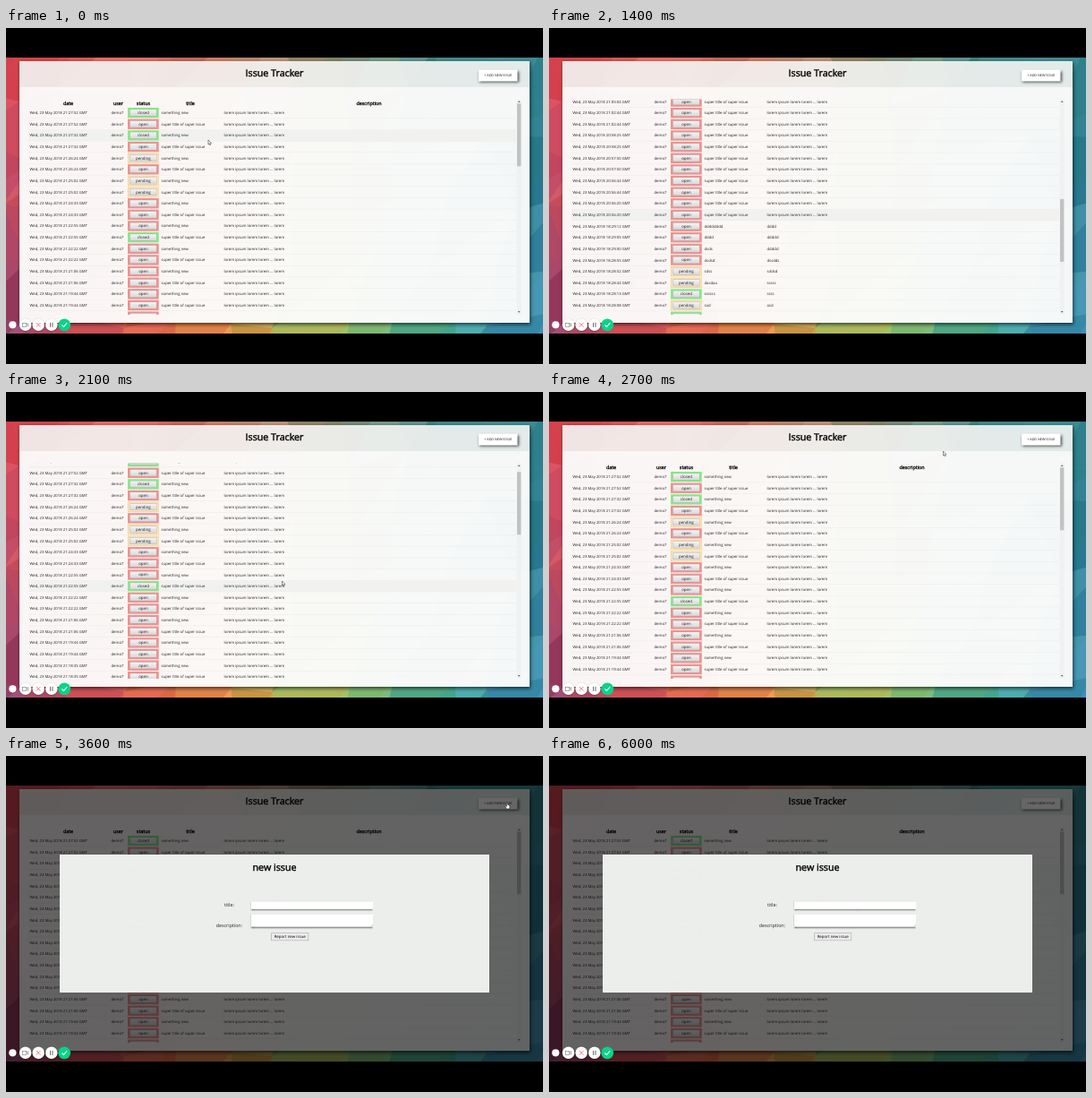
Recreate the animation shown at these times as an HTML page with a canvas. Size 600 by 375 pixels, loop 6.1 s.

```html
<!DOCTYPE html>
<html lang="en">
<head>
<meta charset="utf-8">
<title>Issue Tracker</title>
<style>
  html, body { margin: 0; width: 100%; height: 100%; overflow: hidden; background: #000; }
  canvas { display: block; width: 600px; height: 375px; }
</style>
</head>
<body>
<canvas id="stage"></canvas>
<script>
const W = 600, H = 375, LOOP = 6100, STEP = 100;
const FONT = '"Open Sans", "Noto Sans", sans-serif';
const PITCH = 12.64, FIRST = 94.6;
const VIEW = { top: 79.5, bottom: 320 };
const BORDER = { closed: '#84ec84', open: '#f58f8c', pending: '#fbd08c' };

const canvas = document.getElementById('stage');
const dpr = window.devicePixelRatio || 1;
canvas.width = W * dpr;
canvas.height = H * dpr;
const ctx = canvas.getContext('2d');
ctx.textRendering = 'geometricPrecision';

// ---- table data ----
const pairTimes = ('21:27:52 21:27:32 21:26:24 21:25:02 21:24:33 21:22:55 21:22:22 ' +
  '21:21:06 21:19:44 21:18:35 21:17:26 21:16:51 21:15:10 21:14:19').split(' ');
const soloTimes = ('21:05:04 21:02:44 21:02:44 20:58:25 20:58:25 20:57:50 20:57:50 ' +
  '20:56:44 20:56:44 20:56:20 20:56:20').split(' ');
const notes = `18:29:12 open dddddddd dddd
18:29:05 open dddd ddddd
18:29:00 open dsds ddddd
18:28:55 open dsdsd dssdds
18:28:52 pending sdss sddsd
18:28:44 pending dasdaa sssss
18:28:13 closed ssssss ssss
18:28:08 pending sad asd
18:27:56 closed asd sdsd`.split('\n').map(s => s.split(' '));

function makeRows() {
  const rows = [];
  const lorem = 'lorem ipsum lorem lorem ... lorem';
  const add = (time, status, title, text) => rows.push({ time, status, title, text });
  const special = { 0: 'closed', 2: 'closed', 4: 'pending', 6: 'pending', 7: 'pending', 11: 'closed' };
  for (let i = 0; i < pairTimes.length * 2; i++) {
    add(pairTimes[i >> 1], special[i] || 'open', i % 2 ? 'super title of super issue' : 'something new', lorem);
  }
  soloTimes.forEach(t => add(t, 'open', 'super title of super issue', lorem));
  notes.forEach(n => add(...n));
  for (let i = 0; rows.length < 61; i++) {
    const [, status, title, text] = notes[(i * 5 + 3) % notes.length];
    add('18:2' + (6 - (i >> 2)) + ':' + (52 - (i % 4) * 11), status, title, text);
  }
  return rows;
}
const rows = makeRows();

// ---- helpers ----
function rect(x, y, w, h, fill) {
  ctx.fillStyle = fill;
  ctx.fillRect(x, y, w, h);
}
function shadowed(blur, dx, dy, color, draw) {
  ctx.save();
  ctx.shadowColor = color;
  ctx.shadowBlur = blur * dpr;
  ctx.shadowOffsetX = dx * dpr;
  ctx.shadowOffsetY = dy * dpr;
  draw();
  ctx.restore();
}
function text(str, x, y, size, { align = 'left', color = '#222', bold = 0 } = {}) {
  ctx.font = `${size}px ${FONT}`;
  ctx.textAlign = align;
  ctx.textBaseline = 'alphabetic';
  ctx.fillStyle = ctx.strokeStyle = color;
  const base = y + size * 0.35;
  ctx.fillText(str, x, base);
  if (bold) {
    ctx.lineWidth = bold;
    ctx.strokeText(str, x, base);
  }
}
function line(points, color, width) {
  ctx.beginPath();
  points.forEach(([x, y], i) => i ? ctx.lineTo(x, y) : ctx.moveTo(x, y));
  ctx.strokeStyle = color;
  ctx.lineWidth = width;
  ctx.stroke();
}
function polygon(points, fill) {
  ctx.beginPath();
  points.forEach(([x, y]) => ctx.lineTo(x, y));
  ctx.closePath();
  ctx.fillStyle = fill;
  ctx.fill();
}
function disc(x, y, r, fill) {
  ctx.beginPath();
  ctx.arc(x, y, r, 0, Math.PI * 2);
  ctx.fillStyle = fill;
  ctx.fill();
}
const mix = (a, b, u) => a + (b - a) * u;
const clamp = u => Math.max(0, Math.min(1, u));
const smooth = u => u * u * (3 - 2 * u);

// ---- low-poly backdrop ----
const topTones = [[222, 72, 84], [218, 92, 82], [200, 122, 98], [140, 140, 112], [62, 138, 136], [44, 128, 136]];
const lowTones = [[150, 66, 106], [222, 84, 78], [232, 152, 74], [150, 190, 92], [62, 166, 150], [66, 142, 186]];

function toneAt(u, v, shift) {
  const p = clamp(u) * (topTones.length - 1), i = Math.min(Math.floor(p), topTones.length - 2);
  const c = [0, 1, 2].map(k => Math.round(shift + mix(
    mix(topTones[i][k], topTones[i + 1][k], p - i),
    mix(lowTones[i][k], lowTones[i + 1][k], p - i), clamp(v))));
  return `rgb(${c})`;
}
function drawBackdrop() {
  let seed = 11;
  const rand = () => (seed = seed * 16807 % 2147483647) / 2147483647;
  const cols = 12, lines = 6, cw = 60, ch = 64;
  const pts = [];
  for (let j = 0; j <= lines; j++) {
    for (let i = 0; i <= cols; i++) {
      pts.push([(i - 0.8) * cw + (rand() - 0.5) * 38, 10 + j * ch + (rand() - 0.5) * 40]);
    }
  }
  ctx.save();
  ctx.beginPath();
  ctx.rect(0, 33, W, 308);
  ctx.clip();
  rect(0, 33, W, 308, '#b08078');
  for (let j = 0; j < lines; j++) {
    for (let i = 0; i < cols; i++) {
      const a = j * (cols + 1) + i, b = a + cols + 1;
      for (const tri of [[a, a + 1, b], [a + 1, b + 1, b]]) {
        const p = tri.map(k => pts[k]);
        const cx = (p[0][0] + p[1][0] + p[2][0]) / 3, cy = (p[0][1] + p[1][1] + p[2][1]) / 3;
        const fill = toneAt(cx / W, (cy - 33) / 308, (rand() - 0.5) * 30);
        polygon(p, fill);
        line([...p, p[0]], fill, 0.5);
      }
    }
  }
  ctx.restore();
}

// ---- page ----
function drawPanel() {
  shadowed(4, 1, 1.5, 'rgba(0,0,0,.65)', () => rect(15, 37, 570, 292, '#d8d4d2'));
  ctx.save();
  ctx.beginPath();
  ctx.rect(15, 37, 570, 292);
  ctx.clip();
  ctx.drawImage(backdrop, 0, 0, W, H);
  ctx.restore();
  rect(15, 37, 570, 29, 'rgba(244,244,243,.91)');
  rect(15, 66, 570, 263, 'rgba(252,252,251,.965)');
  text('Issue Tracker', 300, 49.8, 10.7, { align: 'center', color: '#000', bold: 0.4 });
  shadowed(3, 1, 1.2, 'rgba(0,0,0,.7)', () => rect(528, 46.5, 43.5, 13, '#fff'));
  text('+ ADD NEW ISSUE', 549.7, 53, 3.72, { align: 'center', color: '#111' });
}

function drawStatus(status, y) {
  rect(136, y - 5.7, 34.7, 11.4, BORDER[status]);
  if (status === 'pending') rect(137, y - 4.7, 32.7, 9.4, '#fdeccb');
  const g = ctx.createLinearGradient(0, y - 4, 0, y + 4);
  g.addColorStop(0, '#f6f6f6');
  g.addColorStop(1, '#d6d6d6');
  rect(138.3, y - 3.9, 30.1, 7.8, '#aaa');
  rect(138.7, y - 3.5, 29.3, 7, g);
  text(status, 153.4, y - 0.1, 4.4, { align: 'center' });
}

function drawTable(scroll, hover) {
  ctx.save();
  ctx.beginPath();
  ctx.rect(24, VIEW.top, 552, VIEW.bottom - VIEW.top);
  ctx.clip();
  const heads = { date: 69.5, user: 125.5, status: 153.5, title: 206, description: 405.5 };
  for (const name in heads) {
    text(name, heads[name], 84.3 - scroll, 5.4, { align: 'center', color: '#000', bold: 0.28 });
  }
  rows.forEach((row, i) => {
    const y = FIRST + i * PITCH - scroll;
    if (y < VIEW.top - 8 || y > VIEW.bottom + 8) return;
    if (i === hover) rect(25, y - 6.3, 545, 12.6, '#f1f1f0');
    rect(25, y + 6.1, 545, 0.4, '#e6e6e5');
    text('Wed, 23 May 2018 ' + row.time + ' GMT', 26.5, y, 4.25);
    text('demo7', 117.5, y, 4.25);
    drawStatus(row.status, y);
    text(row.title, 173.5, y, 4.25);
    text(row.text, 243.5, y, 4.25);
  });
  ctx.restore();

  rect(570.7, VIEW.top, 5, VIEW.bottom - VIEW.top, '#f1f1f1');
  rect(571, 84.3 + scroll * 0.291, 4.4, 70, '#c2c2c2');
  polygon([[571.8, 83], [574.6, 83], [573.2, 81.2]], '#666');
  polygon([[571.8, 316], [574.6, 316], [573.2, 317.8]], '#666');
}

function drawField(y, h) {
  shadowed(1.5, 0, 0.8, 'rgba(0,0,0,.6)', () => rect(274, y, 136.3, h, '#fff'));
}
function drawDialog() {
  rect(0, 33, W, 308, 'rgba(0,0,0,.6)');
  rect(60, 110, 480, 154, 'rgba(240,242,240,.975)');
  text('new issue', 300, 124.6, 10.7, { align: 'center', color: '#000', bold: 0.4 });
  text('title:', 249.4, 166.5, 5.35, { align: 'center' });
  text('description:', 249.4, 189, 5.35, { align: 'center' });
  drawField(162.3, 8.7);
  drawField(176.3, 14.4);
  line([[407.8, 190], [409.7, 188.1]], '#888', 0.4);
  line([[408.8, 190], [409.7, 189.1]], '#888', 0.4);
  rect(296.3, 197.5, 41.8, 8.6, '#9c9c9c');
  rect(296.8, 198, 40.8, 7.6, '#ececec');
  text('Report new issue', 317.2, 201.8, 4.4, { align: 'center', color: '#000' });
}

function drawRecorder() {
  disc(7.4, 331.3, 4.1, '#fff');
  [21.7, 36.2, 50.8].forEach(x =>
    shadowed(1.5, 0, 0.5, 'rgba(0,0,0,.4)', () => disc(x, 331.3, 6.8, '#fff')));
  disc(65.2, 331.3, 6.9, '#08d48a');
  ctx.strokeStyle = '#777';
  ctx.lineWidth = 0.6;
  ctx.strokeRect(18.6, 329.3, 4.2, 4);
  line([[22.8, 331], [24.8, 329.7], [24.8, 333], [22.8, 331.7]], '#777', 0.6);
  line([[33.8, 328.9], [38.6, 333.7]], '#f0605c', 0.8);
  line([[38.6, 328.9], [33.8, 333.7]], '#f0605c', 0.8);
  line([[49.6, 328.8], [49.6, 333.8]], '#555', 0.9);
  line([[52, 328.8], [52, 333.8]], '#555', 0.9);
  line([[62.4, 331.5], [64.4, 333.5], [68.2, 329.2]], '#fff', 1.1);
}

// ---- pointer ----
const path = [
  [500, 226, 125], [800, 307, 181], [1400, 308, 210], [2100, 308.5, 211],
  [2400, 390, 122], [2600, 412, 98], [2700, 440.5, 66], [3300, 560, 52],
  [3800, 560, 52], [4600, 372, 146], [4800, 372, 146], [5400, 345, 171]
];
function pointerAt(t) {
  const k = path.findIndex(p => p[0] > t);
  if (k === 0) return path[0].slice(1);
  if (k < 0) return path[path.length - 1].slice(1);
  const a = path[k - 1], b = path[k], u = (t - a[0]) / (b[0] - a[0]);
  return [mix(a[1], b[1], u), mix(a[2], b[2], u)];
}
function drawPointer(x, y, dialog) {
  ctx.save();
  ctx.translate(x, y);
  if (x > 528 && y < 60 && y > 46) {
    const hand = [[-0.6, 0], [0.5, 0], [0.6, 2.6], [2.8, 3.2], [2.8, 5.4], [2, 7], [-0.7, 7], [-2.2, 4.3], [-1.6, 3.7], [-0.6, 4.6]];
    polygon(hand, '#fff');
    line([...hand, hand[0]], '#111', 0.5);
  } else if (dialog && x > 274 && x < 410 && y > 162 && y < 172) {
    line([[-0.9, 0], [0.9, 0]], '#999', 0.5);
    line([[0, 0], [0, 2.5]], '#aaa', 0.5);
  } else {
    const arrow = [[0, 0], [0, 5], [1.1, 4], [1.9, 5.8], [2.7, 5.4], [1.9, 3.7], [3.4, 3.6]];
    polygon(arrow, '#fff');
    line([...arrow, arrow[0]], '#222', 0.5);
  }
  ctx.restore();
}

function scrollAt(t) {
  const u = t < 1550 ? (t - 708) / 842 : 1 - (t - 1550) / 628;
  return 400 * smooth(clamp(u));
}

function render(t) {
  const scroll = scrollAt(t);
  const [x, y] = pointerAt(t);
  const dialog = t >= 3500;
  // Hover is refreshed only after the first wheel step.
  const base = t <= 800 ? 0 : scroll;
  const hover = y > VIEW.top && !dialog ? Math.round((y + base - FIRST) / PITCH) : -1;

  ctx.setTransform(dpr, 0, 0, dpr, 0, 0);
  rect(0, 0, W, H, '#000');
  ctx.drawImage(backdrop, 0, 0, W, H);
  drawPanel();
  drawTable(scroll, hover);
  if (dialog) drawDialog();
  drawRecorder();
  if (t < 1300 || t > 1500) drawPointer(x, y, dialog);
}

// Paint the backdrop once and keep a copy.
ctx.setTransform(dpr, 0, 0, dpr, 0, 0);
rect(0, 0, W, H, '#000');
drawBackdrop();
const backdrop = document.createElement('canvas');
backdrop.width = canvas.width;
backdrop.height = canvas.height;
backdrop.getContext('2d').drawImage(canvas, 0, 0);

const start = performance.now();
function tick() {
  const t = (performance.now() - start) % LOOP;
  render(Math.floor(t / STEP) * STEP);
  requestAnimationFrame(tick);
}
tick();
</script>
</body>
</html>
```
